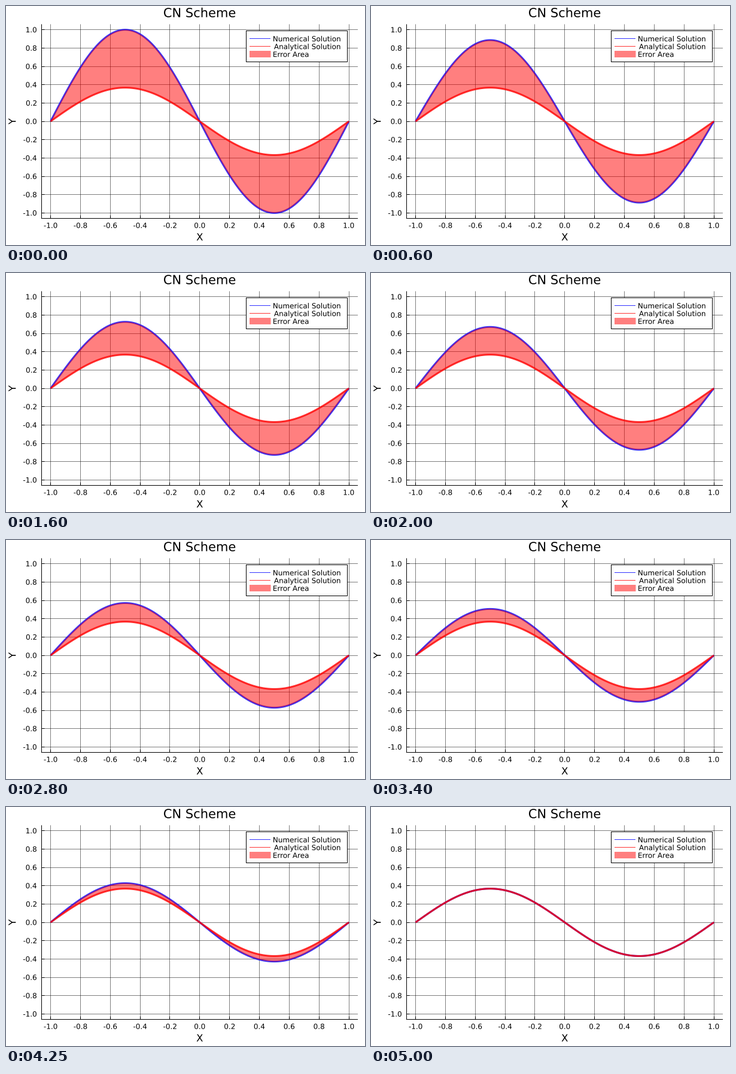
Write a matplotlib script that moves like this. It is 600x400 px and loops after 5.05 s.

```python
import math

import numpy as np
import matplotlib.pyplot as plt
from matplotlib.animation import FuncAnimation
from matplotlib.patches import PathPatch, Polygon, Rectangle
from matplotlib.textpath import TextPath
from matplotlib.transforms import Affine2D

W, H, DPI = 600, 400, 100
PX = 72 / DPI                      # one pixel in points
FRAMES, INTERVAL = 101, 50
LEFT, RIGHT, TOP, BOTTOM = 59.5, 588, 30.5, 355.5

plt.rcParams["font.family"] = "DejaVu Sans"
plt.rcParams["path.simplify"] = False
fig = plt.figure(figsize=(W / DPI, H / DPI), dpi=DPI, facecolor="white")
ax = fig.add_axes([0, 0, 1, 1])
ax.set_xlim(0, W)
ax.set_ylim(H, 0)
ax.axis("off")


def sx(x):
    return 323.75 + 249.25 * x


def sy(y):
    return 193.05 - 153.3 * y


def middle(p):
    """Centre of the pixel that holds p."""
    return math.floor(p) + 0.5


def line(xs, ys, color="black", width=1.0, z=1, **kw):
    return ax.plot(xs, ys, color=color, lw=width * PX, zorder=z, snap=False,
                   solid_capstyle="butt", **kw)[0]


def label(text, x, y, size, align="center", angle=0):
    """Text aligned by its inked width; y is the middle of the capitals."""
    path = TextPath((0, 0), text, size=size)
    box = path.get_extents()
    anchor = {"left": box.x0, "center": (box.x0 + box.x1) / 2,
              "right": box.x1}[align]
    place = (Affine2D().translate(-anchor, -0.3645 * size).scale(1, -1)
             .rotate_deg(-angle).translate(x, y))
    ax.add_patch(PathPatch(place.transform_path(path), fc="black", lw=0,
                           zorder=8, snap=False))


# Grid, ticks and axes
for v in np.arange(-5, 6) / 5:
    x, y = middle(sx(v)), middle(sy(v))
    line([x, x], [TOP, BOTTOM], width=0.5)
    line([LEFT, RIGHT], [y, y], width=0.5)
    line([x, x], [BOTTOM, BOTTOM - 5], z=5)
    line([LEFT, LEFT + 5], [y, y], z=5)
    label(f"{v:.1f}", sx(v), 367.1, 12)
    label(f"{v:.1f}", 50.9, sy(v), 12, "right")
line([LEFT, LEFT], [TOP, BOTTOM + 0.5], z=5)
line([LEFT - 0.5, RIGHT], [BOTTOM, BOTTOM], z=5)

label("CN Scheme", 323.6, 11, 21)
label("X", 323.75, 386.4, 16.5)
label("Y", 10.3, 193.1, 16.5, angle=90)

# Curves
u = np.linspace(-1, 1, 201)
wave = -np.sin(np.pi * u)
px, exact = sx(u), sy(wave * np.exp(-1))
numeric = line(px, sy(wave), "blue", 3, 2, alpha=0.8)
line(px, exact, "red", 3, 3, alpha=0.8)
area = Polygon(np.column_stack([px, exact]), fc="red", alpha=0.5, lw=0,
               zorder=4)
ax.add_patch(area)

# Legend
ax.add_patch(Rectangle((401.5, 41.5), 169, 52, fc="white", ec="black",
                       lw=PX, zorder=6, snap=False))
line([407, 442], [54.5, 54.5], "blue", 1, 7, alpha=0.8)
line([407, 442], [67.5, 67.5], "red", 1, 7, alpha=0.8)
ax.add_patch(Rectangle((407, 75), 35.5, 11, fc="red", alpha=0.5, lw=0,
                       zorder=7, snap=False))
for name, x, y in [("Numerical Solution", 447.0, 54.8),
                   ("Analytical Solution", 448.0, 67.8),
                   ("Error Area", 447.0, 80.8)]:
    label(name, x, y, 12, "left")


def update(i):
    curve = sy(wave * np.exp(-i / (FRAMES - 1)))
    numeric.set_ydata(curve)
    area.set_xy(np.column_stack([np.r_[px, px[::-1]],
                                 np.r_[curve, exact[::-1]]]))
    return numeric, area


anim = FuncAnimation(fig, update, frames=FRAMES, interval=INTERVAL,
                     repeat=True, repeat_delay=0, blit=False)
plt.show()
```
